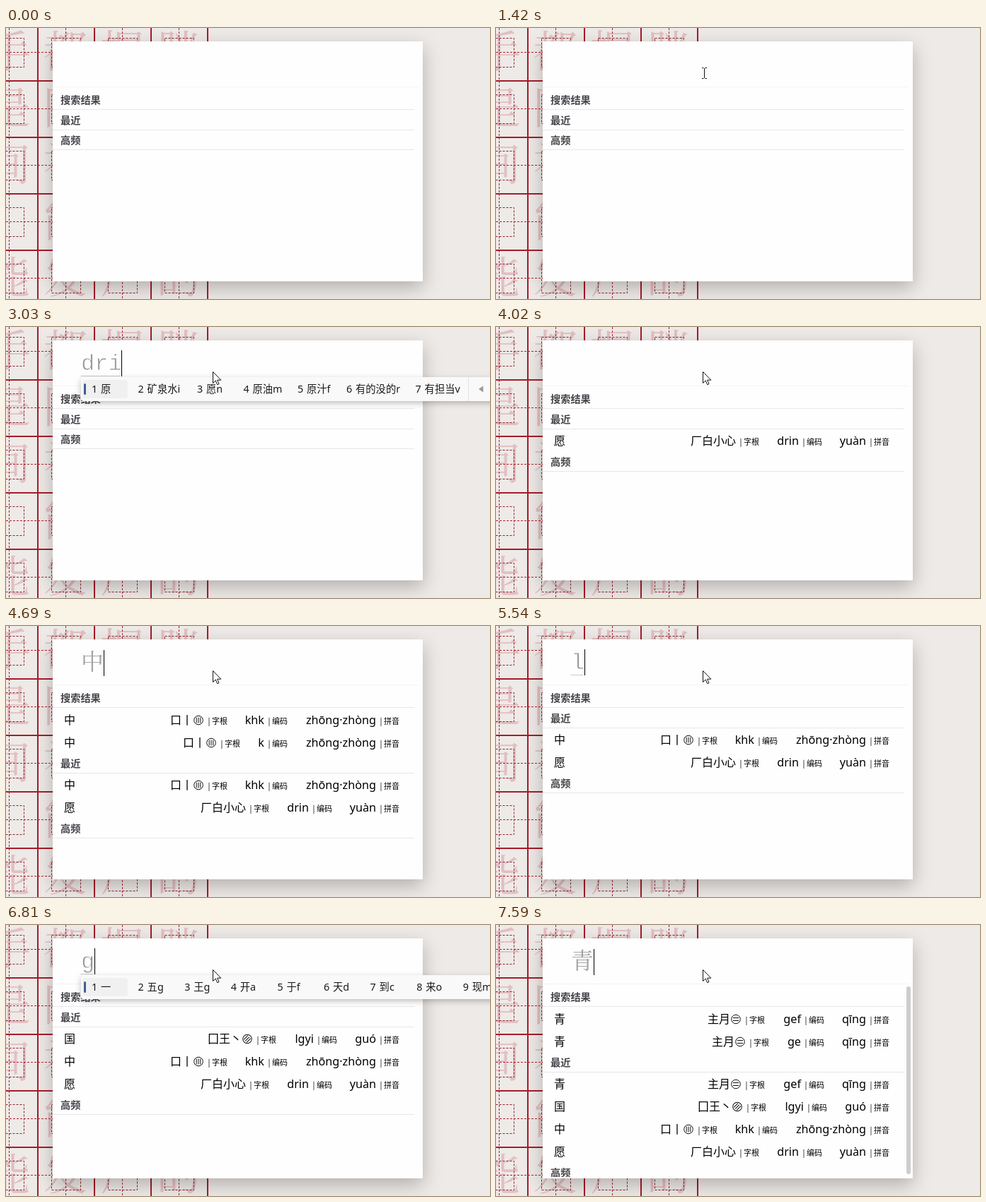
Write an HTML page that moves like this. It is 684 by 384 pixels and loops after 8000 ms.

```html
<!DOCTYPE html>
<html lang="zh-CN">
<head>
<meta charset="utf-8">
<title>字根查询</title>
<style>
  html, body { margin: 0; width: 100%; height: 100%; overflow: hidden; background: #eeeae7; }
  svg { display: block; width: 684px; height: 384px; }
  text { font-family: "Noto Sans", "Noto Sans CJK SC", sans-serif; white-space: pre; }
  .glyph { font: 62px "Noto Serif CJK SC", "Noto Sans CJK SC", serif; fill: #e2bfc1; text-anchor: middle; }
  .cell { stroke: #a51c2a; stroke-width: 2; }
  .cross, .box { fill: none; stroke: #b01e30; stroke-dasharray: 3 2; }
  .box { stroke: #8c2430; }
  .panel { fill: #fefefe; filter: drop-shadow(0 9px 13px rgba(0, 0, 0, .25)); }
  .rule { stroke: #e7e7e7; }
  .head { font: bold 14.2px "Noto Sans CJK SC", sans-serif; fill: #47444a; }
  .han { font: 16px "Noto Sans CJK SC", sans-serif; }
  .latin { font-size: 16.2px; }
  .label { font: 11px "Noto Sans CJK SC", sans-serif; }
  .end { text-anchor: end; }
  .mark { fill: none; stroke: #111; }
  .typed { font: 32px "Liberation Mono", monospace; fill: #929292; stroke: #fefefe; stroke-width: .9; }
  .chosen { font: 32px "Noto Serif CJK SC", "Noto Sans CJK SC", serif; fill: #a3a0a0; }
  .ime { fill: #f9f9f9; filter: drop-shadow(0 3px 4px rgba(0, 0, 0, .25)); }
  .option { font-size: 14.3px; fill: #1a1a1a; }
</style>
</head>
<body>
<svg viewBox="0 0 684 384">
  <defs><clipPath id="view"><rect x="66" y="84" width="523" height="273"/></clipPath></defs>
  <g id="grid"></g>
  <rect class="panel" x="66" y="19" width="523" height="340"/>
  <path d="M66 83.5H583" stroke="#f4f4f4"/>
  <g id="list" clip-path="url(#view)"></g>
  <g id="input"></g>
  <g id="ime"></g>
  <circle id="click" cx="292" cy="63" r="12" fill="#ff0" fill-opacity=".47"/>
  <path id="arrow" d="M.5.5V16.5L4.2 13L6.7 18.7L9 17.7L6.6 12.2H11.8Z" fill="#fff" stroke="#111"/>
  <path id="beam" d="M-1 -6.5H1.5M3.5 -6.5H6M2.5 -6V8M-1 8.5H1.5M3.5 8.5H6" fill="none" stroke="#111"/>
</svg>
<script>
const LOOP = 8000;
const $ = id => document.getElementById(id);
const text = (cls, x, y, s) => `<text class="${cls}" x="${x}" y="${y}">${s}</text>`;
const path = (cls, d) => `<path class="${cls}" d="${d}"/>`;

// codes: [code, right edge of its root column]; mark: [strokes, angle]
const words = {
  愿: { roots: '厂白小心', codes: [['drin', 372], ['drin', 372], ['drin', 372]], sound: 'yuàn', edge: 461 },
  中: { roots: '口丨', mark: [3, 90], codes: [['khk', 313], ['k', 331]], sound: 'zhōng·zhòng', edge: 398 },
  国: { roots: '囗王丶', mark: [3, -45], codes: [['lgyi', 382], ['l', 405]], sound: 'guó', edge: 468 },
  青: { roots: '主月', mark: [2, 0], codes: [['gef', 380], ['ge', 386]], sound: 'qīng', edge: 464 }
};

const options = {
  d: '在 有e 大d 不i 左a 龙x 万n 百j 成n',
  dr: '原 矿泉水i 愿n 厚j 原因l 后悔t 有的是j',
  dri: '原 矿泉水i 愿n 原油m 原汁f 有的没的r 有担当v',
  drin: '愿',
  k: '中 是g 口k 呈g 吕k 品k 员m 足h 吧c',
  l: '国 因d 男l 回k 四h 加k 力t 办w 思n',
  g: '一 五g 王g 开a 于f 天d 到c 来o 现m',
  ge: '青 表e 且g 静q 責m 素x 青年r 青春d 青山m'
};

const steps = [
  [0, { text: '', caret: 0, ime: '', found: '', recent: '' }],
  [1820, { caret: 1 }],
  [2300, { caret: 0 }],
  [2830, { text: 'd', caret: 1 }],
  [2890, { ime: 'd' }],
  [2960, { text: 'dr', ime: 'dr' }],
  [3030, { text: 'dri', ime: 'dri' }],
  [3160, { text: 'drin' }],
  [3230, { ime: 'drin' }],
  [3500, { text: '愿', ime: '' }],
  [3560, { found: '愿', recent: '愿' }],
  [4020, { text: '', caret: 0, found: '' }],
  [4350, { text: 'k', caret: 1 }],
  [4420, { ime: 'k' }],
  [4690, { text: '中', ime: '', found: '中', recent: '中愿' }],
  [5220, { text: '' }],
  [5280, { found: '' }],
  [5540, { text: 'l' }],
  [5610, { ime: 'l' }],
  [5740, { text: '国', ime: '', found: '国', recent: '国中愿' }],
  [6340, { text: '', caret: 0 }],
  [6400, { found: '' }],
  [6740, { text: 'g', caret: 1 }],
  [6810, { ime: 'g' }],
  [7000, { text: 'ge' }],
  [7070, { ime: 'ge' }],
  [7530, { text: '青', ime: '' }],
  [7590, { found: '青', recent: '青国中愿' }]
];

function drawGrid() {
  const rows = ['手都握胖', '是限  ', '间祁  ', ' 能  ', '能发户的'];
  let out = '';
  rows.forEach((row, j) => [...row].forEach((ch, i) => {
    const x = 5 + 80 * i, y = 35 + 80 * j;
    out += text('glyph', x - 1, y + 21, ch)
      + path('cross', `M${x - .5} ${y - 40}v80M${x - 40} ${y - .5}h80`)
      + path('box', `M${x - 20.5} ${y - 20.5}h41v41h-41z`);
  }));
  for (let i = 0; i < 4; i++) {
    out += path('cell', `M${45 + 80 * i} 0V384M0 ${75 + 80 * i}H286`);
  }
  return out;
}

function drawMark([count, angle], x, y) {
  let d = '';
  for (let i = 0; i < count; i++) {
    const v = (i - (count - 1) / 2) * (count > 2 ? 2.8 : 4);
    d += `M-4 ${v}h8`;
  }
  return `<g class="mark" transform="translate(${x} ${y}) rotate(${angle})"><circle r="6.3"/><path d="${d}"/></g>`;
}

function drawRow(ch, n, y) {
  const { roots, mark, codes, sound, edge } = words[ch];
  const [code, rootEdge] = codes[n];
  const label = (x, s) => text('label end', x, y, '| ' + s);
  return text('han', 82, y, ch)
    + text('han end', rootEdge - (mark ? 49 : 33), y, roots)
    + (mark ? drawMark(mark, rootEdge - 41, y - 5.5) : '')
    + label(rootEdge, '字根')
    + text('latin end', edge - 33, y, code) + label(edge, '编码')
    + text('latin end', 523, y, sound) + label(556, '拼音');
}

function drawList({ found, recent }) {
  let y = 87, out = '';
  const head = s => {
    out += text('head', 77, y + 20.3, s);
    y += 28.5;
    out += path('rule', `M66 ${Math.floor(y) + .5}H577`);
  };
  const row = (ch, n) => {
    out += drawRow(ch, n, Math.floor(y + 23.6));
    y += 32;
  };
  head('搜索结果');
  if (found) words[found].codes.forEach((_, n) => row(found, n));
  head('最近');
  for (const ch of recent) row(ch, 0);
  head('高频');
  if (y > 357) out += '<rect x="580" y="87" width="6" height="266" rx="3" fill="#cdcdcd"/>';
  return out;
}

function drawInput({ text: s, caret }) {
  const han = s in words;
  const width = han ? 32 : s.length * 19.2;
  let out = han ? text('chosen', 106, 62, s) : text('typed', 106, 61, s);
  if (s && !han) {
    out += `<path d="M106 69.5h${width - 2}" stroke="#999" stroke-dasharray="1 1"/>`;
  }
  if (caret) {
    out += `<rect x="${Math.floor(106 + width)}" y="${han ? 34 : 33}" width="1" height="37"/>`;
  }
  return out;
}

function drawIme({ ime }) {
  if (!ime) return '';
  let x = 121, items = '';
  options[ime].split(' ').forEach((s, i) => {
    const word = s.replace(/[a-z]/, ''), key = s.slice(word.length);
    const keyWidth = !key ? 0 : key === 'm' ? 12.5 : 'ifrtjl'.includes(key) ? 5 : 8;
    items += text('option', x, 93.3, i + 1) + text('option', x + 13, 93.3, s);
    x += Math.max(65.6, 35.4 + word.length * 14.3 + keyWidth);
  });
  const end = x - 11;
  return `<rect class="ime" x="106" y="71" width="${end - 36}" height="34" rx="4"/>
    <rect x="108" y="75" width="64" height="26" rx="4" fill="#f0f0f0"/>
    <rect x="110" y="80" width="3" height="16" rx="1.5" fill="#3f5e94"/>${items}
    <path d="M${Math.floor(end) + .5} 71v34" stroke="#e2e2e2"/>
    <path d="M${end + 14} 88l6.5 -4.5v9zM${end + 55} 88l-6.5 -4.5v9z" fill="#9a9a9a"/>`;
}

function drawPointer(t) {
  const p = Math.min(10, Math.floor((t - 720) / 70)) / 10;
  const left = (1 - p) ** 2;
  const x = 292 + 263 * left, y = 63 + 206 * left;
  const beam = y < 83 && t < 2890;
  const show = (id, on) => $(id).setAttribute('visibility', on ? 'visible' : 'hidden');
  for (const id of ['arrow', 'beam']) {
    $(id).setAttribute('transform', `translate(${Math.round(x)} ${Math.round(y)})`);
  }
  show('arrow', t >= 720 && !beam);
  show('beam', t >= 720 && beam);
  show('click', t >= 1680 && t < 1890);
}

let last = -1;
function draw(t) {
  const n = steps.filter(([at]) => at <= t).length;
  if (n !== last) {
    const state = Object.assign({}, ...steps.slice(0, n).map(s => s[1]));
    $('list').innerHTML = drawList(state);
    $('input').innerHTML = drawInput(state);
    $('ime').innerHTML = drawIme(state);
    last = n;
  }
  drawPointer(t);
}

$('grid').innerHTML = drawGrid();
const start = performance.now();
function tick() {
  draw((performance.now() - start) % LOOP);
  requestAnimationFrame(tick);
}
tick();
</script>
</body>
</html>
```
